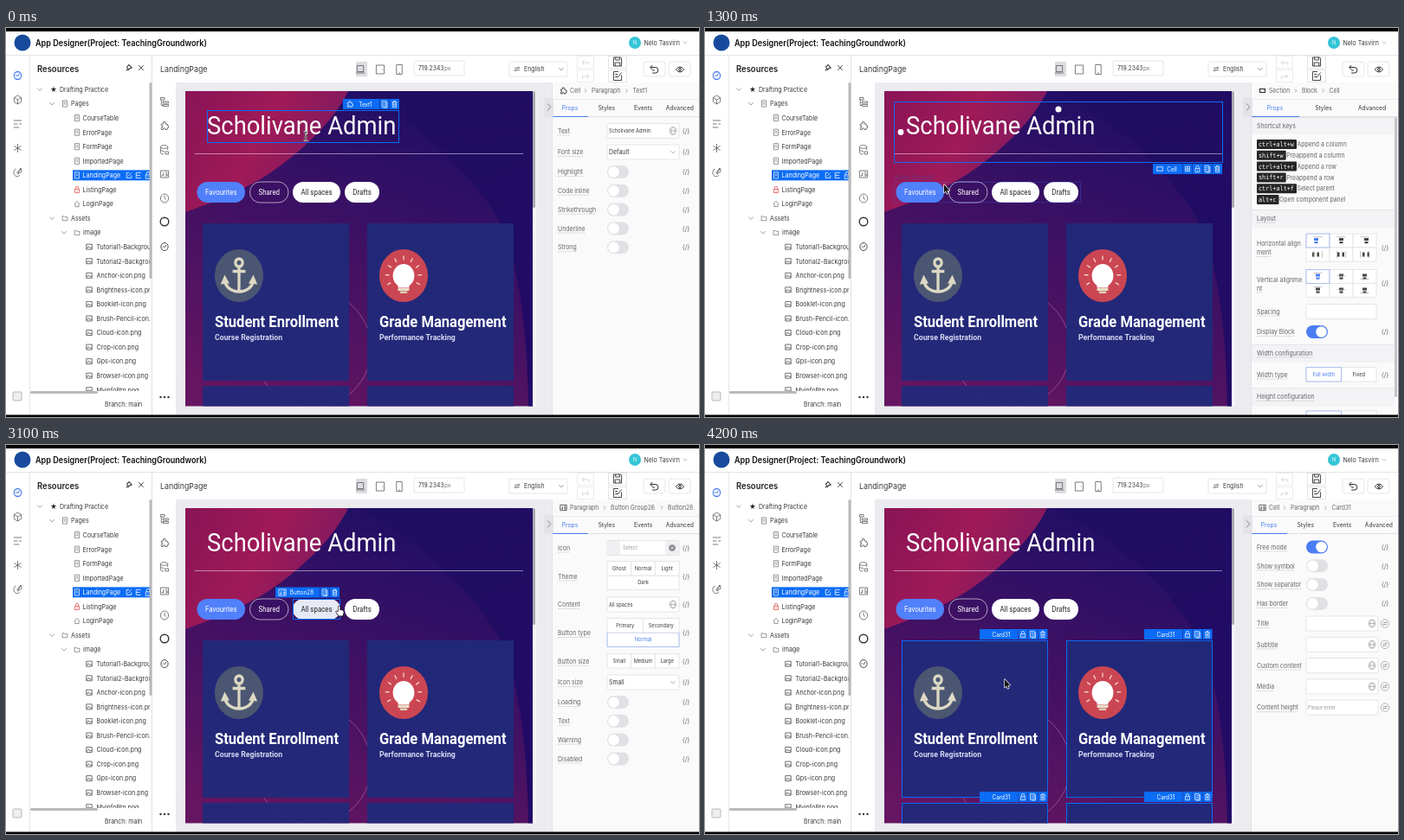
Recreate the animation shown at these times as an HTML page with a canvas. Size 800 by 450 pixels, loop 5000 ms.

```html
<!DOCTYPE html>
<html lang="en">
<head>
<meta charset="utf-8">
<title>App Designer</title>
<style>
html, body { margin: 0; width: 100%; height: 100%; overflow: hidden; background: #fff; }
canvas { display: block; width: 800px; height: 450px; }
</style>
</head>
<body>
<canvas id="stage" width="800" height="450"></canvas>
<script>
const g = document.getElementById('stage').getContext('2d');
const SQUEEZE = 0.92;
const BLUE = '#0b6cf5', LINK = '#4a7df2', INK = '#3c3c40', SOFT = '#66666c', RULE = '#e0e0e4';
const UI = 'Inter, sans-serif', BODY = 'Roboto, sans-serif', CODE = '"DejaVu Sans Mono", monospace';
const PROJECT = 'Scholivane Admin';

function text(s, x, y, size = 7.5, color = INK, { weight = 400, font = UI, align = 'left' } = {}) {
  g.save();
  g.translate(x, y);
  g.scale(SQUEEZE, 1);
  g.font = `${weight} ${size}px ${font}`;
  g.textAlign = align;
  g.textBaseline = 'middle';
  g.fillStyle = color;
  g.fillText(s, 0, 0.5);
  const width = g.measureText(s).width * SQUEEZE;
  g.restore();
  return width;
}
const mid = (s, x, y, size, color, opt) => text(s, x, y, size, color, { ...opt, align: 'center' });

function rect(x, y, w, h, color) { g.fillStyle = color; g.fillRect(x, y, w, h); }
function frame(x, y, w, h, color, dash = []) {
  g.strokeStyle = color; g.lineWidth = 1;
  g.setLineDash(dash);
  g.strokeRect(x + 0.5, y + 0.5, w - 1, h - 1);
  g.setLineDash([]);
}
function round(x, y, w, h, r, fill, stroke) {
  g.beginPath(); g.roundRect(x, y, w, h, r);
  if (fill) { g.fillStyle = fill; g.fill(); }
  if (stroke) { g.strokeStyle = stroke; g.lineWidth = 0.8; g.stroke(); }
}
function disc(x, y, r, color) { g.fillStyle = color; g.beginPath(); g.arc(x, y, r, 0, 7); g.fill(); }

const ICONS = {
  down: 'M-3-1.5L0 1.5L3-1.5', right: 'M-2-4L2 0L-2 4', gt: 'M-1-2L1 0L-1 2', cross: 'M-3-3L3 3M3-3L-3 3',
  page: 'M-3-4H3V4H-3ZM-1.5-1.5H1.5M-1.5.5H1.5', image: 'M-3.5-3H3.5V3H-3.5ZM-3 2L-1-.5L1 1.5L2 .5L3.5 2',
  folder: 'M-3.5-2.5H-1L0-1.5H3.5V3H-3.5Z', lock: 'M-3-.5H3V4H-3ZM-2-.5V-2A2 2 0 0 1 2-2V-.5M0 1V2.5',
  home: 'M-3.5 0L0-3.5L3.5 0M-2.5-.5V3.5H2.5V-.5', pin: 'M0-4L4 0L1 1L-1 3L-3-1ZM-2 2L-4 4',
  gauge: 'M4.5 0A4.5 4.5 0 1 1-4.5 0A4.5 4.5 0 1 1 4.5 0ZM0 1L2-2M-2.5 0H-1',
  cube: 'M0-5L4.5-2.5V2.5L0 5L-4.5 2.5V-2.5ZM-4.5-2.5L0 0L4.5-2.5M0 0V5',
  lines: 'M-5-4H5M-5 0H0M2 0H5M-5 4H2', net: 'M0-5V5M-4.5-2.5L4.5 2.5M4.5-2.5L-4.5 2.5',
  brush: 'M4-5L-1 1M3 3A4.5 4.5 0 1 1-2-4M4-5L5-1L0 2Z',
  outline: 'M-5-4.5H0V-2H-5ZM-2 0H5V2H-2ZM-2 3.5H5V5.5H-2ZM-4-2V4.5H-2',
  puzzle: 'M-4-2H-1.5V-4.5H1V-2H3.5V0H5V2.5H3.5V4.5H1V3H-1.5V4.5H-4V2H-2.5V0H-4Z',
  data: 'M-5-3.5C-5-6 4-6 4-3.5S-5-1-5-3.5V3.5C-5 5-1 5-1 5M4-3.5V0M-5 0C-4 1.5 0 1.5 0 1.5M1 2H5V5H1Z',
  board: 'M-5-4H5V4H-5ZM-3 1V2H-1.5V-2M1-2H3.5M1 0H3.5V2H1', clock: 'M5 0A5 5 0 1 1-5 0A5 5 0 1 1 5 0ZM0-3V0L2 1.5',
  laptop: 'M-4-4H4V3H-4ZM-5.5 4.5H5.5', tablet: 'M-5-5H5V5H-5ZM2.5 0H3.5', phone: 'M-3.5-5.5H3.5V5.5H-3.5ZM-1 4H1',
  save: 'M-5-5H4L5-4V5H-5ZM-2.5-5V-2H2.5V-5M-3 5V1H3V5', note: 'M5-1V5H-5V-5H1M-3-2H0M-3 1H0M0 2L5-4',
  back: 'M-4-2.5H2A3 3 0 0 1 2 4H-2M-2-5L-4.5-2.5L-2 0M-2 1H1', eye: 'M-5 0Q0-6 5 0Q0 6-5 0ZM1.5 0A1.5 1.5 0 1 1-1.5 0A1.5 1.5 0 1 1 1.5 0',
  undo: 'M4 3V0H-4M-1.5-2.5L-4 0L-1.5 2.5', redo: 'M-4 3V0H4M1.5-2.5L4 0L1.5 2.5', swap: 'M-3-1.2H3L1.5-2.8M3 1.2H-3L-1.5 2.8',
  globe: 'M4 0A4 4.4 0 1 1-4 0A4 4.4 0 1 1 4 0ZM-4 0H4M0-4.4C-3-2-3 2 0 4.4C3 2 3-2 0-4.4',
  copy: 'M-3.5-4H2V3.5H-3.5ZM2-2.5H3.5V4.5H-2M-2-1.5H.5M-2 1H.5', bin: 'M-3.5-2.5H3.5M-1-2.5V-4H1V-2.5M-2.5-2.5V4H2.5V-2.5M-.8-1V2.5M.8-1V2.5',
  grid: 'M-3-3H3V3H-3ZM0-3V3M-3 0H3', box: 'M-4-2.5H4V2.5H-4Z', edit: 'M0-3H-3V3H3V0M-1 1L3-3', tree: 'M-3-3H3M-3-3V3H3M-3 0H2'
};
const paths = Object.fromEntries(Object.entries(ICONS).map(([k, d]) => [k, new Path2D(d)]));
function icon(name, x, y, color = INK, width = 0.8, scale = 1) {
  g.save();
  g.translate(x, y); g.scale(SQUEEZE * scale, scale);
  g.strokeStyle = color; g.lineWidth = width;
  g.stroke(paths[name]);
  g.restore();
}

function drawHeader() {
  disc(19, 17, 9.5, '#174a9c');
  text('App Designer(Project: TeachingGroundwork)', 34, 17.5, 9.9, '#111', { weight: 600 });
  disc(726, 17, 7, '#35c5d8');
  mid('N', 726, 17, 6, '#fff');
  text('Nelo Tasvirn', 736.5, 17, 7.6);
  icon('down', 784, 17, '#888', 0.7, 0.8);
  rect(0, 31, 800, 1, '#e4e4e8');
}

const ASSETS = ['Tutorial1-Background', 'Tutorial2-Background', ...['Anchor', 'Brightness', 'Booklet', 'Brush-Pencil',
  'Cloud', 'Crop', 'Gps', 'Browser'].map(n => n + '-icon.png'), 'MyinfoBtn.png'];
const PAGES = ['CourseTable', 'ErrorPage', 'FormPage', 'ImportedPage', 'LandingPage', 'ListingPage', 'LoginPage'];
const TREE = 7.7;

function drawSidebar() {
  rect(27, 32, 1, 416, '#e6e6ea');
  rect(168, 32, 1, 416, '#e0e0e4');
  ['gauge', 'cube', 'lines', 'net', 'brush'].forEach((n, i) => icon(n, 13.5, 55 + i * 28, i ? '#555' : LINK, i ? 0.8 : 1.3));
  round(8, 421, 10, 10, 1, '#eee', '#aaa');
  text('Resources', 36, 47, 10.3, '#222', { weight: 600 });
  icon('pin', 142, 46, INK, 1.4, 0.85);
  icon('cross', 156, 46, INK, 0.9);
  g.save();
  g.beginPath(); g.rect(28, 60, 138, 360); g.clip();
  const row = i => 71 + i * 16.56;
  const branch = (i, x, glyph, name) => {
    icon('down', x, row(i), '#888');
    icon(glyph, x + 15, row(i), '#666', 0.8, 0.9);
    text(name, x + 22, row(i), TREE);
  };
  icon('down', 39, row(0), '#888');
  mid('★', 55, row(0), 9, '#222', { font: '"DejaVu Sans", sans-serif' });
  text('Drafting Practice', 62, row(0), TREE);
  branch(1, 53, 'page', 'Pages');
  PAGES.forEach((name, i) => {
    const y = row(i + 2), on = i === 4;
    if (on) rect(77, y - 6, 89, 12, BLUE);
    icon(i === 5 ? 'lock' : i === 6 ? 'home' : 'page', 82, y, on ? '#fff' : i === 5 ? '#d33' : '#666', 0.8, 0.9);
    text(name, 88.5, y, TREE, on ? '#fff' : INK);
    if (on) ['edit', 'tree', 'lock'].forEach((n, k) => icon(n, 142 + k * 11, y, '#fff'));
  });
  branch(9, 53, 'folder', 'Assets');
  branch(10, 67, 'folder', 'image');
  ASSETS.forEach((name, i) => { icon('image', 96, row(11 + i), '#444'); text(name, 104.5, row(11 + i), TREE); });
  g.restore();
  round(165.5, 63, 3, 227, 1.5, '#b9b9bd');
  round(28, 420, 78, 3, 1.5, '#b9b9bd');
  text('Branch: main', 114, 435, 7.6);
}

function drawTools() {
  text('LandingPage', 178, 47.5, 9.6);
  rect(404, 39, 13, 17, '#dcdce2');
  icon('laptop', 409, 47.5, '#555'); icon('tablet', 432, 48, '#555'); icon('phone', 454, 48, '#555');
  round(471, 38, 58, 17, 1, '#fff', RULE);
  text('719.2343', 476, 46, 7.4);
  text('px', 506, 46, 7, '#777');
  round(581, 39, 67, 17, 1, '#fff', RULE);
  icon('swap', 590, 47.5); text('English', 598, 47.5); icon('down', 641, 47.5, '#888');
  frame(659, 32, 20, 15, '#ececf0'); frame(659, 48, 20, 15, '#ececf0');
  icon('undo', 669, 40, '#ccc'); icon('redo', 669, 56, '#ccc');
  frame(695, 32, 22, 15, '#e4e4e8'); frame(695, 48, 22, 15, '#e4e4e8');
  icon('save', 706, 39, INK, 1); icon('note', 706, 55.5, INK, 1);
  round(736, 39, 25, 17, 3, '#fff', RULE); round(765, 39, 25, 17, 3, '#fff', RULE);
  icon('back', 748, 48, '#222', 1); icon('eye', 778, 48, '#222', 1);
  ['outline', 'puzzle', 'data', 'board', 'clock'].forEach((n, i) => icon(n, 183, 85 + i * 28, '#555'));
  g.strokeStyle = '#333'; g.lineWidth = 1.4;
  g.beginPath(); g.arc(183, 224, 4.8, 0, 7); g.stroke();
  icon('gauge', 183, 253, '#444', 1);
  for (let i = -1; i < 2; i++) disc(183 + i * 4.5, 427, 1.2, '#333');
}

function gradient(x0, y0, x1, y1, ...colors) {
  const fill = g.createLinearGradient(x0, y0, x1, y1);
  colors.forEach((c, i) => fill.addColorStop(i / (colors.length - 1), c));
  return fill;
}

function anchor(x, y) {
  g.save();
  g.translate(x, y); g.scale(SQUEEZE, 1);
  disc(0, 0, 30.5, '#4b5672');
  g.strokeStyle = g.fillStyle = '#dcd8c3';
  g.lineWidth = 3.6;
  g.stroke(new Path2D('M4.5-15A4.5 4.5 0 1 1-4.5-15A4.5 4.5 0 1 1 4.5-15ZM0-10V20M-8-5H8M-18 5C-16 23 16 23 18 5'));
  g.fill(new Path2D('M-18-1L-23 10L-12 9ZM18-1L23 10L12 9Z'));
  g.restore();
}
function bulb(x, y) {
  g.save();
  g.translate(x, y); g.scale(SQUEEZE, 1);
  disc(0, 0, 30.5, '#cb4653');
  g.strokeStyle = '#f2d9c8'; g.lineWidth = 1.4;
  for (let i = 0; i < 9; i++) {
    const a = Math.PI * (0.85 + i * 0.1625), c = Math.cos(a), s = Math.sin(a);
    g.beginPath(); g.moveTo(c * 18, s * 18); g.lineTo(c * 23, s * 23); g.stroke();
  }
  disc(0, 0, 13.5, '#fff');
  rect(-7, 9, 14, 5, '#fff');
  rect(-7, 14.5, 14, 3, '#e8dfc8'); rect(-4.5, 18, 9, 2.5, '#d8cfb8');
  g.restore();
}

const PILLS = [['Favourites', 220.5, 55.5], ['Shared', 281.5, 44.5], ['All spaces', 331, 55], ['Drafts', 391, 40]];
const CARDS = [[227, 'Student Enrollment', 'Course Registration', anchor], [417, 'Grade Management', 'Performance Tracking', bulb]];

function drawPage(sel) {
  rect(196, 63, 434, 385, '#ebebf0');
  g.save();
  g.beginPath(); g.rect(207, 73, 402, 364.5); g.clip();
  rect(207, 73, 402, 365, gradient(430, 90, 300, 437, '#230f66', '#441163', '#651561'));
  g.fillStyle = gradient(480, 80, 600, 420, '#200e63', '#220a66');
  g.fill(new Path2D('M405 73C470 105 545 170 575 235C592 280 602 350 603 438H610V73Z'));
  g.fillStyle = gradient(215, 90, 370, 170, '#8c1457', '#a01a58', '#7c1a60');
  g.fill(new Path2D('M207 73H395C380 105 345 140 306 167C275 188 240 201 207 213Z'));
  g.strokeStyle = 'rgba(220,150,200,.5)'; g.lineWidth = 0.8;
  g.beginPath(); g.arc(354, 371, 67.5, 0, 7); g.stroke();
  text(PROJECT, 232, 114, 29.8, '#fff', { font: BODY });
  rect(218, 145, 379, 1, 'rgba(255,255,255,.48)');

  PILLS.forEach(([name, x, w], i) => {
    const hot = sel.pill === i;
    const fill = [hot ? '#2c69e6' : '#5180fb', hot ? '#cbc8da' : '', hot ? '#e6eaf5' : '#fff', hot ? '#e6eaf5' : '#fff'][i];
    round(x, 178, w, 24, 12, fill, i === 1 ? 'rgba(255,255,255,.75)' : null);
    mid(name, x + w / 2, 189.8, 8.6, i < 2 ? '#fff' : '#222', { font: BODY });
  });
  for (const [x, title, sub, art] of CARDS) {
    rect(x, 226, 169, 182, 'rgba(33,42,122,.95)');
    rect(x, 414, 169, 30, 'rgba(33,42,122,.93)');
    art(x + 42, 286.5);
    text(title, x + 14, 340, 18, '#fff', { font: BODY, weight: 700 });
    text(sub, x + 14, 357.5, 9.5, '#d5daf2', { font: BODY, weight: 700 });
  }
  drawSelection(sel);
  g.restore();
  rect(608, 73, 4, 365, '#f4f4f6');
  round(608, 73, 3, 135, 1.5, '#aaaab0');
}

function tag(name, x, y, w, lead, ...tools) {
  rect(x, y, w, 12, BLUE);
  if (lead) icon(lead, x + 8, y + 6, '#fff', 0.9, lead === 'puzzle' ? 0.75 : 0.9);
  mid(name, x + w / 2 + (lead ? 5 : 3), y + 6, 6.9, '#fff');
  tools.forEach((n, i) => {
    rect(x + w + 0.5 + i * 11.5, y, 11, 12, BLUE);
    icon(n, x + w + 6 + i * 11.5, y + 6, '#fff', 0.8, 0.9);
  });
}

function drawSelection({ kind, pill }) {
  if (kind === 'text') {
    frame(232, 95, 222, 38, BLUE);
    tag('Text1', 389, 82, 42, 'puzzle', 'copy', 'bin');
  } else if (kind === 'cell') {
    frame(218, 85, 380, 71, BLUE);
    tag('Cell', 517, 157, 34, 'box', 'grid', 'lock', 'copy', 'bin');
    frame(218, 178, 216, 24, 'rgba(60,110,240,.55)', [1, 1]);
    text('Button Group26', 219, 173, 6.5, 'rgba(90,60,150,.8)');
  } else if (kind === 'button') {
    const [, x, w] = PILLS[pill];
    frame(Math.floor(x), 178, Math.ceil(w), 24, BLUE);
    if (pill === 0) tag('Button27', 220, 165, 52, '', 'copy', 'bin');
    else tag('Button28', Math.round(x + w) - 75, 164.5, 51, 'board', 'copy', 'bin');
  } else {
    for (const [x] of CARDS) {
      frame(x, 226, 169, 182, BLUE);
      frame(x, 414, 169, 40, BLUE);
      for (const y of [213, 401]) tag('Card31', x + 90, y, 44, '', 'lock', 'copy', 'bin');
    }
  }
  if (kind === 'cell' || pill === 0) { disc(226, 120.5, 3.4, '#fff'); disc(408, 94, 3.5, '#fff'); }
}

function label(s, y) {
  const w = text(s, 637, y, 7.5, SOFT);
  g.strokeStyle = '#aaa'; g.lineWidth = 0.7; g.setLineDash([1, 1]);
  g.beginPath(); g.moveTo(637, y + 5); g.lineTo(637 + w, y + 5); g.stroke();
  g.setLineDash([]);
}
const binding = y => mid('{/}', 785, y, 7.5, '#666');
function field(y, value, tool, size = 6.2, color = INK) {
  round(694, y - 8.5, 83, 17, 1, '#fff', RULE);
  text(value, 696, y, size, color);
  if (tool) icon(tool, 770, y, '#999', 0.7);
}
function toggle(name, y, on) {
  label(name, y);
  round(694, y - 7.5, 25, 15, 7.5, on ? '#4a7cf3' : '#e1e1e5');
  disc(on ? 711.5 : 701.5, y, 6.3, '#fff');
  binding(y);
}
function segments(y, names, active, width = 83) {
  const w = width / names.length;
  names.forEach((n, i) => {
    round(694 + i * w, y, w, 16.5, 0, '#fff', RULE);
    mid(n, 694 + (i + 0.5) * w, y + 8, 6.2, n === active ? LINK : INK);
  });
  const k = names.indexOf(active);
  if (k >= 0) round(694 + k * w, y, w, 16.5, 0, null, '#9db7f3');
}
function band(s, y, h, plain) {
  rect(631, y, 165, h, '#f3f3f5');
  rect(631, y, 165, 0.7, RULE);
  plain ? text(s, 637, y + h / 2, 7.5, SOFT) : label(s, y + h / 2 - 0.5);
}

function textPanel() {
  label('Text', 119); field(119, PROJECT, 'globe'); binding(119);
  label('Font size', 143.5); field(143.5, 'Default', 'down', 7.5); binding(143.5);
  ['Highlight', 'Code inline', 'Strikethrough', 'Underline', 'Strong'].forEach((n, i) => toggle(n, 166.5 + i * 21.8));
}

// Two rows of three little alignment pictures; the first is chosen.
function alignGrid(y, upright) {
  for (let i = 0; i < 6; i++) {
    const c = i % 3, r = Math.floor(i / 3), x = 694 + c * 27, cy = y + r * 16;
    const tint = i ? '#444' : LINK, shift = (c - 1) * 2;
    round(x, cy, 27, 16, 0, '#fff', RULE);
    if (r && !upright) {
      rect(x + 9 + shift, cy + 5.5, 2.5, 5, tint); rect(x + 14.5 + shift, cy + 5.5, 2.5, 5, tint);
      rect(x + 8, cy + 4, 0.6, 8, '#999'); rect(x + 18.5, cy + 4, 0.6, 8, '#999');
    } else {
      rect(x + 11 + (upright ? 0 : shift), cy + 5, 5, 3, tint); rect(x + 11.5 + (upright ? 0 : shift), cy + 9, 4, 2.2, tint);
      rect(x + 8.5, cy + (upright ? 7 + shift * 1.8 : 3.5), 10, 0.6, '#999');
    }
  }
  round(694, y, 27, 16, 0, null, '#9db7f3');
}
const SHORTCUTS = [['ctrl+alt+w', 'Append a column'], ['shift+w', 'Preappend a column'], ['ctrl+alt+r', 'Append a row'],
  ['shift+r', 'Preappend a row'], ['ctrl+alt+f', 'Select parent'], ['alt+c', 'Open component panel']];

function cellPanel() {
  band('Shortcut keys', 103, 20, true);
  SHORTCUTS.forEach(([keys, what], i) => {
    const y = 134.5 + i * 12.8, w = keys.length * 4.1 + 5;
    round(637, y - 5.5, w, 11, 1, '#262628');
    text(keys, 639, y, 7.4, '#fff', { font: CODE });
    text(what, 637 + w + 0.5, y, 7.5, SOFT);
  });
  band('Layout', 210, 21);
  text('Horizontal align', 637, 249.5, 7.5, SOFT); label('ment', 259.5);
  alignGrid(238); binding(254);
  text('Vertical alignme', 637, 291, 7.5, SOFT); label('nt', 301);
  alignGrid(279.5, true); binding(295);
  label('Spacing', 328); round(694, 319.5, 81, 17, 1, '#fff', RULE);
  toggle('Display Block', 351.5, true);
  band('Width configuration', 366, 21);
  label('Width type', 401); segments(392.5, ['Full width', 'Fixed'], 'Full width', 81); binding(401);
  band('Height configuration', 416.5, 21);
  segments(443, ['', ''], '', 81);
  round(796, 103, 3, 324, 1.5, '#c3c3c7');
}

function buttonPanel(pill) {
  label('Icon', 119);
  round(694, 110.5, 83, 17, 1, '#fff', RULE);
  rect(694, 111, 15, 16, '#f0f0f2'); rect(761, 111, 16, 16, '#f0f0f2');
  text('Select', 712, 119, 6.1, '#999');
  disc(769, 119, 3.8, '#8a8a90'); icon('cross', 769, 119, '#fff', 1.4, 0.5);
  label('Theme', 152);
  segments(151, ['Dark']); segments(134.5, ['Ghost', 'Normal', 'Light'], pill === 1 ? 'Ghost' : '');
  label('Content', 184.5); field(184.5, PILLS[pill][0], pill ? 'globe' : '');
  label('Button type', 217.5);
  segments(217, ['Normal'], pill ? 'Normal' : ''); segments(200.5, ['Primary', 'Secondary'], pill ? '' : 'Primary');
  label('Button size', 250); segments(241.5, ['Small', 'Medium', 'Large']);
  label('Icon size', 274.5); field(274.5, 'Small', 'down', 7.5);
  for (const y of [119, 152, 184.5, 217.5, 250, 274.5]) binding(y);
  ['Loading', 'Text', 'Warning', 'Disabled'].forEach((n, i) => toggle(n, 297.5 + i * 21.8));
}

function cardPanel() {
  ['Free mode', 'Show symbol', 'Show separator', 'Has border'].forEach((n, i) => toggle(n, 118 + i * 21.8, !i));
  ['Title', 'Subtitle', 'Custom content', 'Media', 'Content height'].forEach((n, i) => {
    const y = 206.5 + i * 24.3, last = i === 4;
    label(n, y);
    field(y, last ? 'Please enter' : '', last ? '' : 'globe', 5.9, '#999');
    g.strokeStyle = '#999'; g.lineWidth = 0.7;
    g.beginPath(); g.arc(785, y, 4.8, 0, 7); g.stroke();
    icon('swap', 785, y, '#777', 0.8, 0.85);
  });
}

const CRUMBS = {
  text: [['Cell', 651], ['Paragraph', 676], ['Text1', 723.5]],
  cell: [['Section', 651], ['Block', 689], ['Cell', 720.5]],
  button: [['Paragraph', 651], ['Button Group26', 698], ['Button2', 764]],
  card: [['Cell', 651], ['Paragraph', 676], ['Card31', 723.5]]
};

function drawPanel({ kind, pill }) {
  rect(630, 63, 170, 385, '#fafafb');
  rect(630, 63, 1, 385, '#e2e2e6');
  const lead = kind === 'text' ? 'puzzle' : kind === 'cell' || pill === 0 ? 'box' : 'board';
  icon(lead, 643.5, 72.5, '#222', lead === 'box' ? 1.4 : 0.9, 0.8);
  CRUMBS[kind].forEach(([name, x], i) => {
    const s = kind === 'button' && i === 2 ? name + (pill ? 8 : 7) : name;
    text(s, x, 72.5, 7.4, SOFT);
    if (i) icon('gt', x - 7, 72.5, '#888');
  });
  const tabs = kind === 'cell' ? ['Props', 'Styles', 'Advanced'] : ['Props', 'Styles', 'Events', 'Advanced'];
  const step = kind === 'cell' ? 56 : 42.3, first = kind === 'cell' ? 658 : 651;
  rect(630, 82, 170, 0.7, '#e6e6ea');
  rect(630, 102, 170, 1, RULE);
  tabs.forEach((n, i) => mid(n, first + i * step, 92.5, 7.3, i ? INK : LINK));
  rect(630, 102, (first - 630) * 2, 1, LINK);
  ({ text: textPanel, cell: cellPanel, button: buttonPanel, card: cardPanel })[kind](pill);
  round(621, 81, 11, 22, 2, '#e3e3e8');
  icon('right', 627, 91.5, '#666');
}

const CURSORS = {
  arrow: new Path2D('M0 0V9.5L2.2 7.4L3.7 10.8L5.2 10.1L3.7 6.9H6.8Z'),
  hand: new Path2D('M-1.5-5Q0-6 .5-4.5V-1L4-.5Q5.5 0 5 2L4 5.5H-1L-4 1.5Q-4.5 0-3 .3L-1.5 1.5Z'),
  beam: new Path2D('M-2.5-5Q0-5 0-3.5Q0-5 2.5-5M0-3.5V3.5M-2.5 5Q0 5 0 3.5Q0 5 2.5 5M-1.5 1H1.5')
};
const ROUTE = [
  [0, 346, 125, 'beam'], [300, 345, 126, 'beam'], [500, 338, 139, 'arrow'], [700, 333.5, 146, 'arrow'],
  [1000, 322, 151, 'arrow'], [1300, 276, 181, 'arrow'], [1500, 262.5, 190, 'hand'], [1900, 262.5, 190, 'hand'],
  [2200, 313, 193, 'hand'], [2500, 313, 193, 'hand'], [2800, 358, 192, 'hand'], [3000, 360, 192, 'hand'],
  [3200, 410, 192, 'hand'], [3400, 402, 205, 'arrow'], [3600, 377, 231, 'arrow'], [3900, 349, 267, 'arrow'], [4200, 346, 271, 'arrow']
];
function drawCursor(t) {
  const i = Math.max(0, ROUTE.findLastIndex(k => k[0] <= t));
  const a = ROUTE[i], b = ROUTE[i + 1] ?? a;
  const p = b === a ? 0 : (t - a[0]) / (b[0] - a[0]), e = p * p * (3 - 2 * p);
  const shape = CURSORS[a[3]];
  g.save();
  g.translate(a[1] + (b[1] - a[1]) * e, a[2] + (b[2] - a[2]) * e);
  g.scale(SQUEEZE, 1);
  g.lineJoin = 'round';
  const beam = a[3] === 'beam', hand = a[3] === 'hand';
  g.strokeStyle = hand ? '#111' : '#fff'; g.lineWidth = beam ? 2 : 1.4;
  g.stroke(shape);
  if (beam) { g.strokeStyle = '#111'; g.lineWidth = 0.9; g.stroke(shape); }
  else { g.fillStyle = hand ? '#fff' : '#111'; g.fill(shape); }
  g.restore();
}

const SELECTIONS = [
  [0, { kind: 'text' }], [1000, { kind: 'cell' }], [1600, { kind: 'button', pill: 0 }], [2200, { kind: 'button', pill: 1 }],
  [2800, { kind: 'button', pill: 2 }], [3200, { kind: 'button', pill: 3 }], [3900, { kind: 'card' }]
];
function draw(now) {
  const t = Math.min(4200, Math.floor((now % 5000) / 100) * 100);
  const sel = SELECTIONS.findLast(s => s[0] <= t)[1];
  rect(0, 0, 800, 450, '#fff');
  drawHeader();
  drawSidebar();
  drawTools();
  drawPage(sel);
  drawPanel(sel);
  drawCursor(t);
  rect(0, 0, 800, 4, '#000');
  rect(0, 447.5, 800, 2.5, '#000');
}

let start;
function tick(now) {
  start ??= now;
  draw(now - start);
  requestAnimationFrame(tick);
}
draw(0);
requestAnimationFrame(tick);
</script>
</body>
</html>
```
